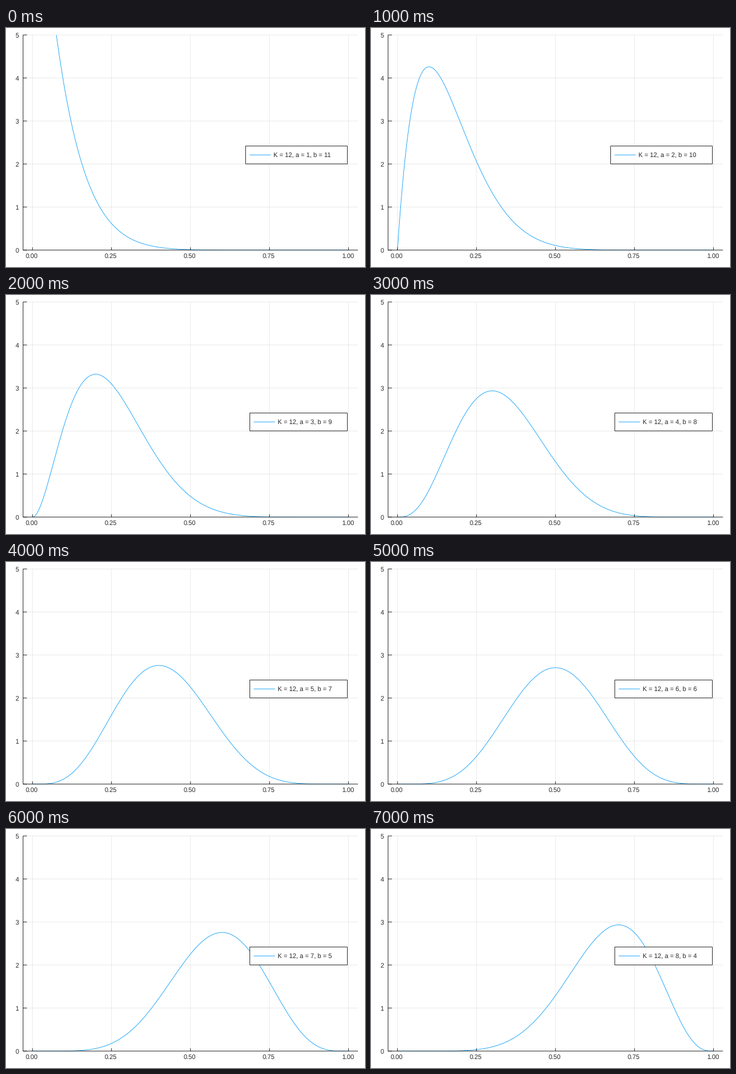
Recreate the animation shown at these times as a matplotlib script. Size 600 by 400 pixels, loop 8 s.

```python
import math

import numpy as np
import matplotlib.pyplot as plt
from matplotlib.animation import FuncAnimation
from matplotlib.patches import Rectangle

W, H, DPI = 600, 400, 100
PX = 72 / DPI  # one pixel in points
STROKE = 0.8 * PX
K = 12
BLUE = "#009AFA"
INK = "#262626"
LEFT, RIGHT, TOP, BOTTOM = 28.4, 588.2, 11.75, 371.75
X0, X_UNIT = 44.2, 528.1
Y_UNIT = (BOTTOM - TOP) / 5

plt.rcParams.update({
    "font.family": "Liberation Sans",
    "font.size": 10.67 * PX,
    "text.hinting": "none",
    "path.snap": False,
})

fig = plt.figure(figsize=(W / DPI, H / DPI), dpi=DPI, facecolor="white")
ax = fig.add_axes([0, 0, 1, 1])
ax.set_xlim(0, W)
ax.set_ylim(H, 0)
ax.axis("off")


def segment(xs, ys, z, color="black", **style):
    return ax.plot(xs, ys, color=color, zorder=z, lw=STROKE,
                   solid_capstyle="butt", **style)[0]


def label(x, y, text, align):
    return ax.text(x, y, text, ha=align, va="baseline", color=INK, zorder=8)


def draw_axes():
    for i in range(5):
        x = X0 + X_UNIT * i / 4
        segment([x, x], [TOP, BOTTOM], 1, alpha=0.1)
        segment([x, x], [367, BOTTOM], 4)
        label(x - 1.2, 385, f"{i / 4:.2f}", "center")
    for i in range(6):
        y = BOTTOM - Y_UNIT * i
        segment([LEFT, RIGHT], [y, y], 1, alpha=0.1)
        segment([LEFT, 35], [y, y], 4)
        label(21.4, y + 4.25, str(i), "right")
    segment([LEFT, RIGHT], [BOTTOM, BOTTOM], 4)
    segment([LEFT, LEFT], [TOP, BOTTOM], 4)


def beta_pdf(x, a, b):
    norm = math.gamma(a + b) / (math.gamma(a) * math.gamma(b))
    return norm * x ** (a - 1) * (1 - x) ** (b - 1)


draw_axes()
grid = np.linspace(0, 1, 1001)
curve = segment([], [], 3, BLUE, solid_joinstyle="round")
curve.set_clip_path(Rectangle((LEFT, TOP), RIGHT - LEFT, BOTTOM - TOP,
                              transform=ax.transData))

box = Rectangle((0, 197.5), 1, 30, fc="white", ec="black", lw=STROKE, zorder=6)
ax.add_patch(box)
key = segment([], [], 7, BLUE)
caption = label(0, 217, "", "left")


def update(i):
    a = i + 1
    b = K - a
    curve.set_data(X0 + X_UNIT * grid, BOTTOM - Y_UNIT * beta_pdf(grid, a, b))
    # a two-digit b needs a wider legend
    left = 400.6 if b > 9 else 407.5
    box.set_x(left)
    box.set_width(570.4 - left)
    key.set_data([left + 6.5, left + 42], [212.5, 212.5])
    caption.set_x(left + 46.4)
    caption.set_text(f"K = {K}, a = {a}, b = {b}")
    return curve, box, key, caption


anim = FuncAnimation(fig, update, frames=8, interval=1000, repeat=True,
                     repeat_delay=0, blit=False)
plt.show()
```
